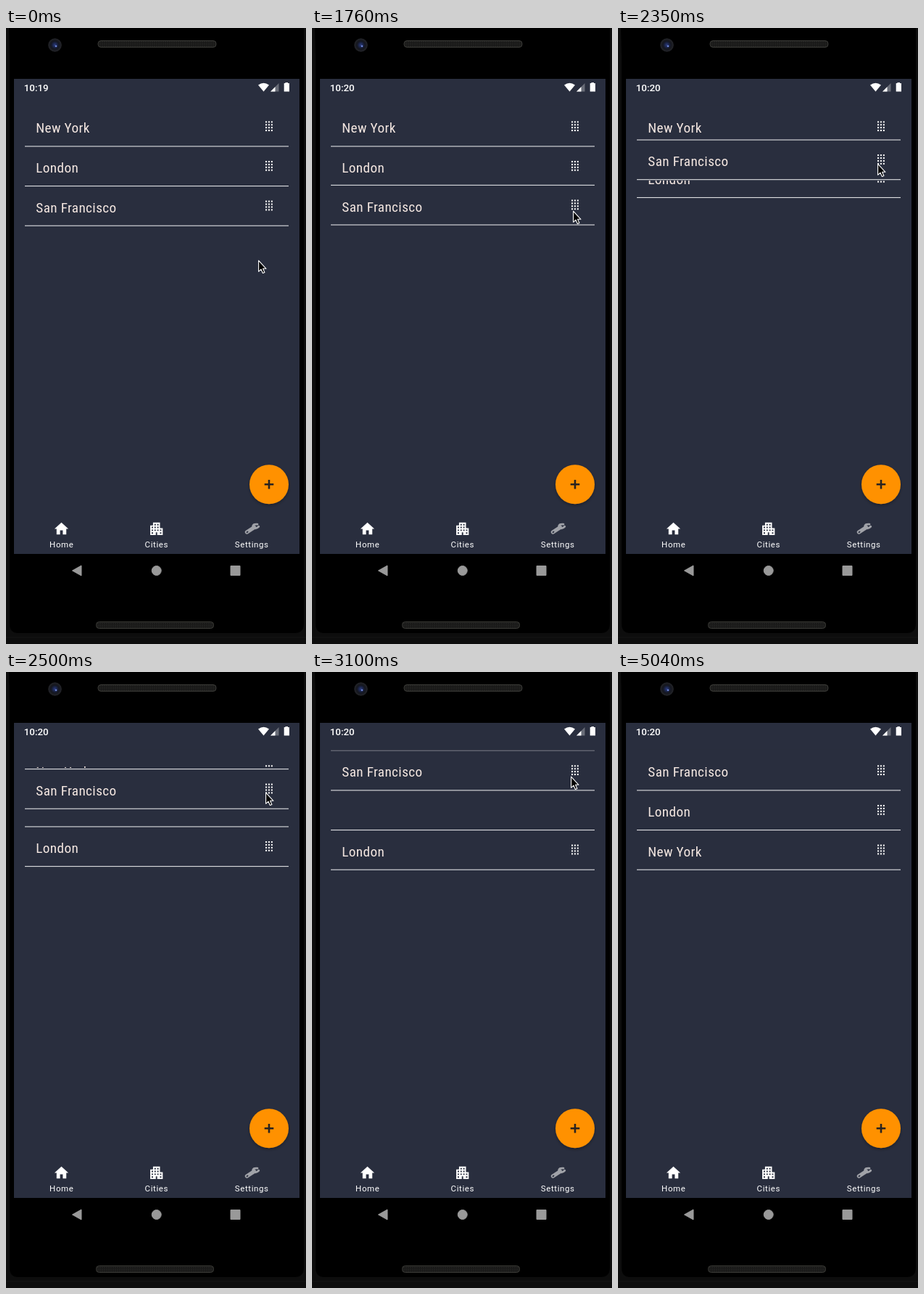
Write an HTML page that moves like this. It is 414x848 px and loops after 5340 ms.

```html
<!DOCTYPE html>
<html lang="en">
<head>
<meta charset="utf-8">
<title>Reorder cities</title>
<style>
  html, body { margin: 0; width: 100%; height: 100%; overflow: hidden; background: #000; }
  svg { display: block; width: 414px; height: 848px; }
  text { font-family: Roboto, sans-serif; fill: #fff; }
  .city { font: 400 19.2px "Roboto Condensed", Roboto, sans-serif; font-stretch: 75%; letter-spacing: .38px; fill: #f5e8e2; }
  .label { font-size: 11.5px; letter-spacing: .6px; text-anchor: middle; }
  .clock { font-size: 13.4px; font-weight: 500; }
</style>
</head>
<body>
<svg viewBox="0 0 414 848">
  <defs>
    <pattern id="mesh" width="3" height="3" patternUnits="userSpaceOnUse">
      <rect width="3" height="3" fill="#191918"/>
      <circle cx="1" cy="1" r=".8" fill="#2b2b29"/>
    </pattern>
    <radialGradient id="lens">
      <stop offset="0" stop-color="#2c3d80"/>
      <stop offset=".35" stop-color="#1a2344"/>
      <stop offset=".6" stop-color="#14161e"/>
      <stop offset="1" stop-color="#25262a"/>
    </radialGradient>
    <filter id="shadow" x="-30%" y="-30%" width="160%" height="160%">
      <feDropShadow dx="0" dy="2" stdDeviation="2" flood-opacity=".3"/>
    </filter>
  </defs>

  <!-- phone body -->
  <rect width="414" height="848" fill="#0d0d0d"/>
  <path d="M4 0H411V820Q411 833 398 833H17Q5 833 5 820V40Z"/>
  <path d="M0 839H414" stroke="#151515"/>
  <circle cx="67.5" cy="23.5" r="9.3" fill="url(#lens)"/>
  <circle cx="69" cy="25" r="1.3" fill="#7088d8"/>
  <g fill="url(#mesh)" stroke="#3b3b37">
    <rect x="127" y="17.5" width="163" height="9" rx="4"/>
    <rect x="124.5" y="817.5" width="162" height="9" rx="4"/>
  </g>

  <!-- screen and status bar -->
  <rect x="11" y="70" width="394" height="654" fill="#292e3e"/>
  <text id="clock" class="clock" x="24.7" y="87"></text>
  <g fill="#fff">
    <path d="M348 78.5Q355.500 73 363 78.500L355.500 87.500Z"/>
    <path d="M376.500 76V87.500H365Z" opacity=".3"/>
    <path d="M371.500 81V87.500H365Z"/>
    <path d="M385.500 75H389V76H391V87.500H383.700V76H385.500Z"/>
  </g>

  <g id="rows"></g>

  <!-- add button -->
  <circle cx="363" cy="628.3" r="27" fill="#ff9100" filter="url(#shadow)"/>
  <path d="M356.700 628.300H369.300M363 622V634.600" stroke="#292320" stroke-width="2.6"/>

  <!-- tabs -->
  <g fill="#fff">
    <path transform="translate(65 678) scale(.958)" d="M10 20v-6h4v6h5v-8h3L12 3 2 12h3v8z"/>
    <path transform="translate(196.2 678) scale(.958)" d="M17 11V3H7v4H3v14h8v-4h2v4h8V11h-4zM7 19H5v-2h2v2zm0-4H5v-2h2v2zm0-4H5V9h2v2zm4 4H9v-2h2v2zm0-4H9V9h2v2zm0-4H9V5h2v2zm4 8h-2v-2h2v2zm0-4h-2V9h2v2zm0-4h-2V5h2v2zm4 12h-2v-2h2v2zm0-4h-2v-2h2v2z"/>
  </g>
  <g fill="none" stroke="#a0a2a8" stroke-linecap="round">
    <path d="M332.500 694L342.500 687.500" stroke-width="5.4"/>
    <path d="M347 683.200Q340 682.300 340.600 687.300Q345 690.500 348.800 686.300" stroke-width="2.8"/>
    <path d="M332.500 694.200L333.500 693.500" stroke="#292e3e" stroke-width="1.8"/>
  </g>
  <text class="label" x="76.8" y="714.7">Home</text>
  <text class="label" x="207.8" y="714.7">Cities</text>
  <text class="label" x="339.2" y="714.7">Settings</text>

  <!-- system navigation -->
  <g fill="#999" stroke="#999" stroke-linejoin="round">
    <path d="M91.500 747L104 740V754Z"/>
    <circle cx="207.7" cy="747" r="6.5"/>
    <rect x="310" y="740.5" width="13" height="13"/>
  </g>

  <path id="cursor" d="M.6.2V15.300L4 12.200L6.400 17.500L8.900 16.400L6.600 11.300H11Z" stroke="#fff" stroke-width="1.1" stroke-linejoin="round"/>
</svg>
<script>
const LOOP = 5340, STEP = 148.2, PHASE = 28;
const TICK = 8, DROP = 23, LEAVE = 34; // in steps
const PITCH = 54.65;
const slot = i => 107.7 + PITCH * i;

const mix = (a, b, u) => a + (b - a) * u;
const linear = u => u;
const glide = u => u * u * u * (u * (6 * u - 15) + 10);
const accelerate = u => u ** 1.6;
const progress = (step, from, to) => Math.min(1, Math.max(0, (step - from) / (to - from)));

// Where the pointer arrives, at which step, and how it gets there
const stops = [
  { at: 0, x: 348, y: 320 },
  { at: 1, x: 353, y: 329, ease: linear },
  { at: 2, x: 358, y: 322, ease: linear },
  { at: 3, x: 358, y: 322, ease: linear },
  { at: 10, x: 359, y: 253, ease: linear },
  { at: 11.2, x: 360, y: 253, ease: linear },
  { at: 19.8, x: 357, y: 145, ease: glide },
  { at: 26, x: 357, y: 142, ease: linear },
  { at: 30, x: 378, y: 560, ease: accelerate },
  { at: 33, x: 366, y: 845, ease: linear }
];

function pointerAt(step) {
  const i = stops.findIndex(s => s.at > step);
  if (i < 0) return stops.at(-1);
  const from = stops[i - 1], to = stops[i];
  const u = to.ease(progress(step, from.at, to.at));
  return { x: mix(from.x, to.x, u), y: mix(from.y, to.y, u) };
}

function makeRow(name) {
  let dots = "";
  for (let r = 0; r < 4; r++)
    for (let c = 0; c < 3; c++)
      dots += `<rect x="${358 + 3.9 * c}" y="${20.6 + 3.9 * r}" width="2.1" height="2.1"/>`;
  const row = document.createElementNS("http://www.w3.org/2000/svg", "g");
  row.innerHTML = `<rect x="26" y="-1" width="364" height="57.5" fill="#292e3e"/>
    <text class="city" x="41.3" y="36.7">${name}</text>
    <g fill="#f4f4f4">${dots}</g>
    <g fill="#dfe0e3"><rect class="top" x="26" width="364" height="1.1"/>
    <rect x="26" y="${PITCH}" width="364" height="1.1"/></g>`;
  document.getElementById("rows").append(row);
  return row;
}

const [newYork, london, sanFrancisco] = ["New York", "London", "San Francisco"].map(makeRow);
const clock = document.getElementById("clock");
const cursor = document.getElementById("cursor");

// The first slot hides the row's upper line, except for a trace while it is held
function place(row, top, firstSlotLine = 0) {
  row.setAttribute("transform", `translate(0 ${top})`);
  row.querySelector(".top").setAttribute("opacity", top > slot(0) + .3 ? 1 : firstSlotLine);
}

function draw() {
  const step = Math.floor((performance.now() % LOOP + PHASE) / STEP);
  const dropped = step >= DROP;
  const lift = glide(progress(step, 11, 20.2));
  const giveWay = dropped ? 0 : glide(progress(step, 15, 17.6));
  place(newYork, slot(dropped ? 2 : 0));
  place(london, slot(1 + giveWay));
  place(sanFrancisco, slot(2 - 2 * lift), dropped ? 0 : .4);

  const { x, y } = pointerAt(step);
  cursor.setAttribute("transform", `translate(${Math.round(x)} ${Math.round(y)})`);
  cursor.setAttribute("visibility", step < LEAVE ? "visible" : "hidden");
  clock.textContent = step < TICK ? "10:19" : "10:20";
  requestAnimationFrame(draw);
}
draw();
</script>
</body>
</html>
```
